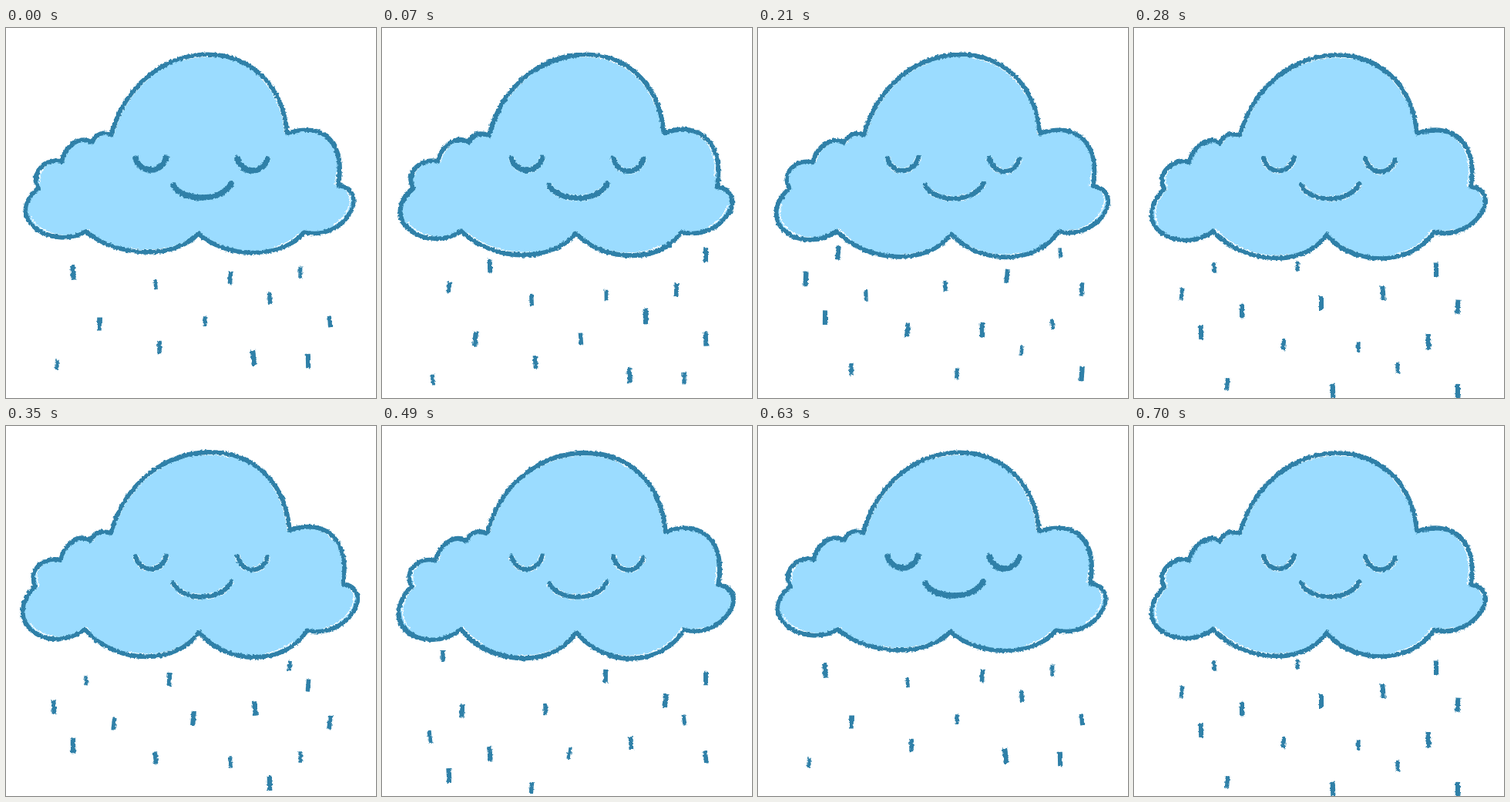
Write an HTML page that moves like this. It is 480 by 480 pixels and loops after 770 ms.

```html
<!DOCTYPE html>
<html lang="en">
<head>
<meta charset="utf-8">
<title>Rain cloud</title>
<style>
html, body { margin: 0; width: 100%; height: 100%; overflow: hidden; background: #fff; }
svg { display: block; width: 100%; height: 100%; }
</style>
</head>
<body>
<svg viewBox="0 0 480 480">
  <filter id="rough" filterUnits="userSpaceOnUse" x="0" y="0" width="480" height="480" color-interpolation-filters="sRGB">
    <feTurbulence id="noise" type="fractalNoise" baseFrequency=".3" numOctaves="2"/>
    <feDisplacementMap in="SourceGraphic" scale="4" xChannelSelector="R" yChannelSelector="G"/>
  </filter>
  <g id="art" filter="url(#rough)" fill="none"></g>
</svg>
<script>
const INK = '#2f80a8', SKY = '#9bdcff', STEP = 70, DRAWINGS = 9;
// After the nine drawings, the first and the fifth are shown once more.
const ORDER = [...Array(DRAWINGS).keys(), 0, 4];

// Clockwise from the left foot of the dome: start of the lobe, then the
// Bezier handles relative to its start and its end.
const LOBES = [
  [138,139, 38,-137, -12,-138],
  [364,136, 49,-17, 10,-53],
  [432,205, 44,8, 52,12],
  [387,265, -28,34, 38,34],
  [250,267, -30,34, 38,34],
  [104,264, -45,26, -48,37],
  [42,208, -12,-22, -18,-6],
  [73,174, 5,-21, -15,-10],
  [112,149, 5,-12, -11,-4]
];
// Eyes and mouth: both ends and the lowest y.
const FACE = [[168,169,208,168,186], [300,169,339,170,187], [217,204,292,202,222]];
// Where each drop would be in the first drawing.
const DROPS = [
  [87,317], [194,333], [291,324], [382,317], [342,351], [121,384], [258,381], [420,381],
  [199,414], [321,428], [392,432], [66,437], [140,289], [420,272], [104,233], [62,267],
  [243,267], [323,254], [392,224], [212,231], [368,199], [79,162], [290,167], [420,170]
];

const art = document.getElementById('art');
const noise = document.getElementById('noise');

const rand = n => {
  const s = Math.sin(n * 12.9898) * 43758.5453;
  return s - Math.floor(s);
};
const wobble = (n, size) => (rand(n) * 2 - 1) * size;
const stroke = (d, color, width, extra = '') =>
  `<path d="${d}" stroke="${color}" stroke-width="${width}" stroke-linejoin="round" ${extra}/>`;

// The cloud grows wider and its underside sags as growth goes from 0 to 1.
function cloudPath(p, growth) {
  const joints = LOBES.map(([x, y], i) => [
    x + (x - 200) * .025 * growth + wobble(p * 37 + i, 1),
    y + wobble(p * 53 + i, 1)
  ]);
  return LOBES.reduce((d, [, , ax, ay, bx, by], i) => {
    const [x1, y1] = joints[i], [x2, y2] = joints[(i + 1) % joints.length];
    const sag = i > 2 && i < 6 ? 1 + .4 * growth : 1;
    return d + `C${x1 + ax} ${y1 + ay * sag} ${x2 + bx} ${y2 + by * sag} ${x2} ${y2}`;
  }, `M${joints[0]}`) + 'Z';
}

const facePath = growth => FACE.map(([x1, y1, x2, y2, low]) => {
  const y = (low - 2 * (1 - growth) - (y1 + y2) / 8) / .75, inset = (x2 - x1) * .15;
  return `M${x1} ${y1}C${x1 + inset} ${y} ${x2 - inset} ${y} ${x2} ${y2}`;
}).join('');

// Drops on the right fall faster; they show only below the cloud.
const rain = p => DROPS.map(([x, start], i) => {
  const y = start + p * (x < 230 ? 19.5 : 22.5);
  if (y < 290 || y > 472) return '';
  const size = rand(i + p * 31 + 1), half = 6 + size * 4, lean = wobble(i * 7 + p, 1);
  return stroke(`M${x + lean} ${y - half}l${-2 * lean} ${half * 2}`, INK, 4.5 + size * 2);
}).join('');

function draw(p) {
  const growth = Math.sqrt(p / (DRAWINGS - 1));
  const cloud = cloudPath(p, growth), face = facePath(growth), width = 7.5 - 2 * growth;
  const slip = `stroke-dashoffset="${p * 83}"`;
  noise.setAttribute('seed', p + 1);
  art.innerHTML = rain(p) +
    `<path d="${cloud}" fill="${SKY}"/>` +
    stroke(cloud, '#fff', 1.4, `stroke-dasharray="90 50 40 70 130 60" ${slip} transform="translate(5.3 3.6) scale(.978)"`) +
    stroke(cloud, INK, 5.6) +
    stroke(cloud, INK, 4.5, `stroke-dasharray="120 70 60 90" ${slip} transform="translate(${wobble(p, 1.3)} ${wobble(p + 9, 1.3)})"`) +
    stroke(face, '#fff', width + 2, `stroke-dasharray="14 6 9 8" ${slip} opacity="${growth}"`) +
    stroke(face, INK, width, 'stroke-linecap="round"');
}

let shown = -1;
function tick() {
  const p = ORDER[Math.floor(performance.now() / STEP) % ORDER.length];
  if (p !== shown) draw(shown = p);
  requestAnimationFrame(tick);
}
tick();
</script>
</body>
</html>
```
